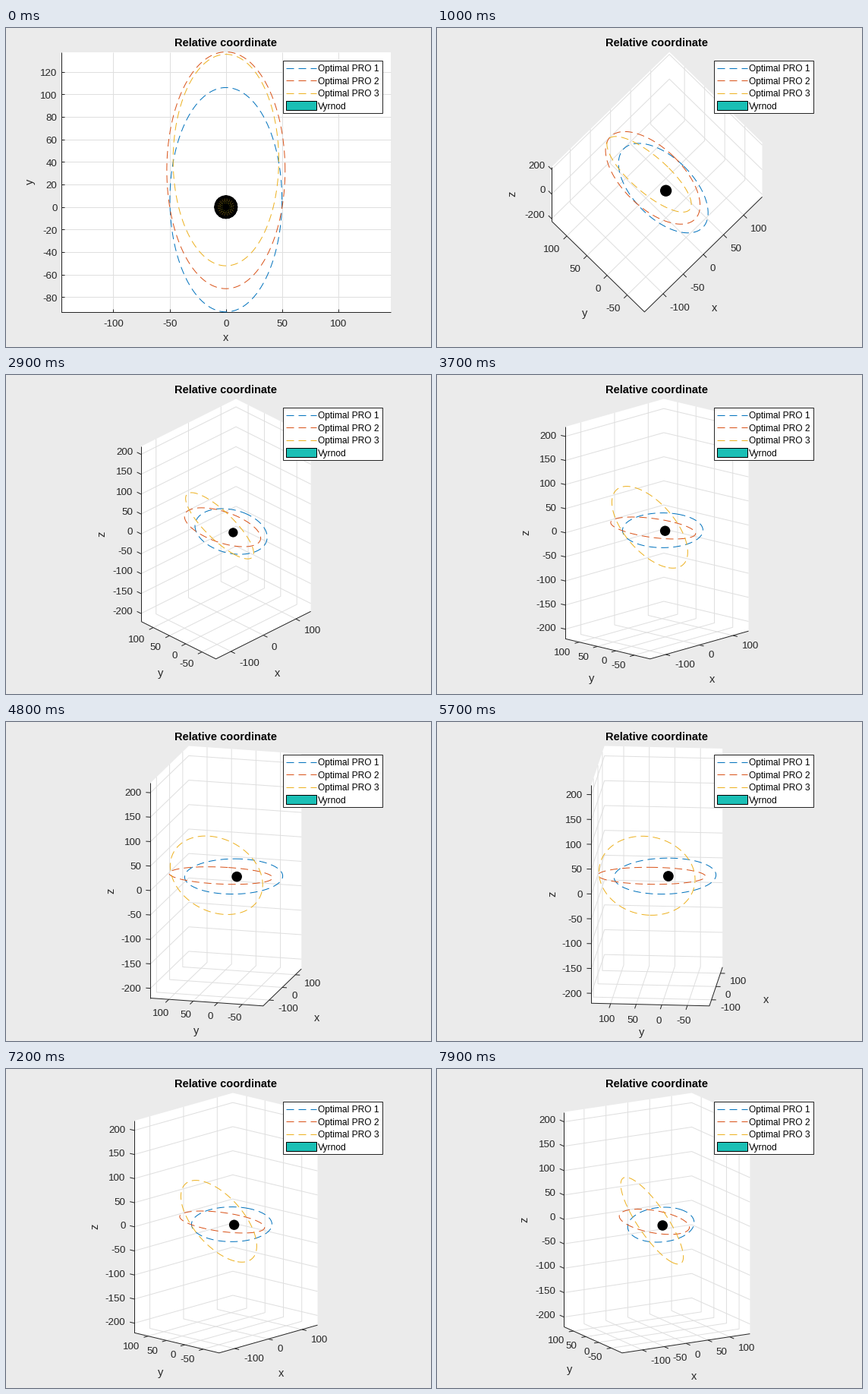
These frames come from a looping animation (560x420 px, 8 s). A matplotlib script:

```python
import numpy as np
import matplotlib.pyplot as plt
from matplotlib.animation import FuncAnimation
from matplotlib.collections import LineCollection, PolyCollection
from matplotlib.patches import Circle, Polygon, Rectangle

W, H, DPI = 560, 420, 100
PX = 72 / DPI                      # points per pixel
plt.rcParams["font.family"] = "Liberation Sans"

GREY, INK, GRID = "#ebebeb", "#262626", "#dfdfdf"
TEAL = "#1abfb5"
BOX_W, BOX_H = 434, 342.3          # plot area in pixels
CX, CY = 289.8, 202.65
LO = np.array([-146.2, -93.0, -220.0])
HI = np.array([146.2, 137.6, 220.0])
MID, SPAN = (LO + HI) / 2, HI - LO
BALL = 10.2

# name, colour, x half-width, y centre, z cosine and sine parts
ORBITS = [
    ("Optimal PRO 1", "#0072bd", 49.75, 6.5, 23, -3),
    ("Optimal PRO 2", "#d95319", 52.5, 32.6, 3, -0.5),
    ("Optimal PRO 3", "#edb120", 46.9, 41.7, -92, 2),
]
DASH = (0, (10, 6))

fig = plt.figure(figsize=(W / DPI, H / DPI), dpi=DPI, facecolor=GREY)
ax = fig.add_axes([0, 0, 1, 1])


class View:
    """Orthographic camera fitted to the plot area."""

    def __init__(self, az, el):
        self.az, self.el = az, el
        a, e = np.radians([az, el])
        ca, sa, ce, se = np.cos(a), np.sin(a), np.cos(e), np.sin(e)
        self.right = np.array([ca, sa, 0])
        self.up = np.array([-sa * se, ca * se, ce])
        self.toward = np.array([sa * ce, -ca * ce, se])
        self.scale = min(BOX_W / (SPAN @ abs(self.right)),
                         BOX_H / (SPAN @ abs(self.up)))

    def __call__(self, x, y, z):
        p = np.stack(np.broadcast_arrays(x, y, z), -1) - MID
        return np.stack([CX + self.scale * (p @ self.right),
                         CY - self.scale * (p @ self.up)], -1)

    def axis(self, i):
        """Screen vector of the whole axis i."""
        return self.scale * SPAN[i] * np.array([self.right[i], -self.up[i]])


def camera(n):
    if n < 5:
        return 0, 90
    if n < 36:
        return -45, 90 - 2.5 * (n - 5)
    if n < 55:
        return -45 - 2.5 * (n - 36), 15
    return -90 + 2.5 * (n - 55), 15


def ticks(i, step):
    first = np.ceil(LO[i] / step) * step
    return np.arange(first, HI[i], step)


def unit(v):
    return v / max(np.hypot(*v), 1e-9)


def label(x, y, s, size=13.33, ha="center", color=INK, rot=0, **kw):
    ax.text(x, y, s, fontsize=size * PX, ha=ha, va="baseline", color=color,
            rotation=rot, rotation_mode="anchor", zorder=9, **kw)


def number(x, y, value, ha):
    label(x, y + 4.8, f"{value:.0f}", ha=ha)


def lines(segs, color, z):
    ax.add_collection(LineCollection(segs, colors=color, linewidths=PX, zorder=z))


def draw_flat(v):
    left, top, bottom = CX - BOX_W / 2, CY - BOX_H / 2, CY + BOX_H / 2
    ax.add_patch(Rectangle((left, top), BOX_W, BOX_H, fc="white", zorder=0))
    grid, axes = [], [[(left, top), (left, bottom), (left + BOX_W, bottom)]]
    for t in ticks(0, 50):
        x = v(t, 0, 0)[0]
        grid.append([(x, top), (x, bottom)])
        axes.append([(x, bottom), (x, bottom - 4.3)])
        number(x, 388, t, "center")
    for t in ticks(1, 20):
        y = v(0, t, 0)[1]
        grid.append([(left, y), (left + BOX_W, y)])
        axes.append([(left, y), (left + 4.3, y)])
        number(67.5, y + 0.5, t, "right")
    lines(grid, GRID, 1)
    lines(axes, INK, 2)
    label(290, 411.5, "x", 14.67)
    label(35.5, 202, "y", 14.67, rot=90)


def draw_box(v):
    (x0, y0, z0), (x1, y1, z1) = LO, HI
    hull = [(x0, y0, z0), (x1, y0, z0), (x1, y0, z1),
            (x1, y1, z1), (x0, y1, z1), (x0, y1, z0)]
    ax.add_patch(Polygon([v(*p) for p in hull], fc="white", ec="none", zorder=0))

    vx, vy, vz = v.axis(0), v.axis(1), v.axis(2)
    zlen = np.hypot(*vz)
    show_z = v.el < 89.9
    xt = ticks(0, 50 if np.hypot(*vx) > 146 else 100)
    yt = ticks(1, 50)
    zt = ticks(2, 50 if zlen > 222 else 100 if zlen > 111 else 200)

    grid = []
    for t in xt:
        grid.append([v(t, y0, z0), v(t, y1, z0), v(t, y1, z1)])
    for t in yt:
        grid.append([v(x0, t, z0), v(x1, t, z0), v(x1, t, z1)])
    if show_z:
        for t in zt:
            grid.append([v(x0, y1, t), v(x1, y1, t), v(x1, y0, t)])
    lines(grid, GRID, 1)

    axes = [[v(x1, y0, z0), v(x0, y0, z0), v(x0, y1, z0)]]
    out_x, out_y, out_z = unit(-vy), unit(-vx), unit(vy)
    for t in xt:
        p = v(t, y0, z0)
        axes.append([p, p + 6 * out_x])
        number(p[0] + 12 * out_x[0], p[1] + 9.5 + 10.5 * out_x[1], t, "left")
    level = abs(vy[1]) < 0.1 * abs(vy[0])
    for t in yt:
        p = v(x0, t, z0)
        axes.append([p, p + 6 * out_y])
        reach = 14 if level else 12
        number(p[0] + reach * out_y[0], p[1] + 9.5 + 10.5 * out_y[1], t,
               "center" if level else "right")
    if show_z:
        axes.append([v(x0, y1, z0), v(x0, y1, z1)])
        for t in zt:
            p = v(x0, y1, t)
            axes.append([p, p + 6 * out_z])
            number(p[0] + 12 * out_z[0], p[1] + 9 * out_z[1], t, "right")
        p = v(x0, y1, 0)
        label(p[0] - 47.5, p[1], "z", 14.67, rot=90)
    lines(axes, INK, 2)

    # axis names sit outside the numbers and slide with the elevation
    slide = 0.69 * (v.el - 15)
    t = unit(vx)
    p = v(0, y0, z0) + (40 - 30 * t[1]) * np.array([-t[1], t[0]]) + (4 - slide) * t
    label(p[0], p[1] + 4, "x", 14.67)
    t = unit(vy)
    p = v(x0, MID[1], z0) + (39 - 27 * t[1]) * np.array([t[1], -t[0]]) + (11 - slide) * t
    label(p[0], p[1] + 2, "y", 14.67)


def draw_orbits(v):
    th = np.linspace(0, 2 * np.pi, 361)
    hub = v(0, 0, 0)
    for _, color, a, c, zc, zs in ORBITS:
        x, y = a * np.cos(th), c + 2 * a * np.sin(th)
        z = zc * np.cos(th) + zs * np.sin(th)
        p = v(x, y, z)
        ax.plot(*p.T, color=color, lw=PX, ls=DASH, dash_capstyle="butt", zorder=3)
        near = np.stack([x, y, z], -1) @ v.toward > 0
        over = near & (np.hypot(*(p - hub).T) < BALL * v.scale)
        if over.any():
            ax.plot(*np.where(over[:, None], p, np.nan).T, color=color, lw=PX, zorder=5)


def draw_ball(v, mesh):
    hub, r = v(0, 0, 0), BALL * v.scale
    ax.add_patch(Circle(hub, r, fc="black", ec="none", zorder=4))
    if not mesh:
        return
    faces, tint = [], []
    for k in range(2, 9):
        lat = np.radians([9 * k, 9 * k + 9])
        c = (1 + np.cos(lat[0])) / 2
        rgb = [np.interp(c, [0.5, 0.65, 0.8, 0.9, 1], ch) for ch in (
            [0.10, 0.45, 0.82, 0.99, 0.97],
            [0.74, 0.79, 0.75, 0.76, 0.98],
            [0.72, 0.42, 0.20, 0.22, 0.08])]
        for j in range(20):
            a = np.radians([18 * j, 18 * j + 18])
            rr = r * np.sin(lat)
            faces.append([hub + rr[m] * np.array([np.cos(a[n]), np.sin(a[n])])
                          for m, n in ((0, 0), (1, 0), (1, 1), (0, 1))])
            tint.append(rgb)
    ax.add_collection(PolyCollection(faces, facecolors=tint, edgecolors="black",
                                     linewidths=1.25 * PX, zorder=4.5))


def draw_legend():
    ax.add_patch(Rectangle((364.5, 42.5), 131, 69, fc="white", ec=INK, lw=PX, zorder=7))
    for k, orbit in enumerate(ORBITS):
        y = 52.5 + 16.7 * k
        ax.plot([368.5, 408.5], [y, y], color=orbit[1], lw=PX, ls=DASH,
                dash_capstyle="butt", zorder=8)
        label(411, y + 4.5, orbit[0], 12, "left", "black")
    ax.add_patch(Rectangle((368.5, 95.5), 40, 12, fc=TEAL, ec="black", lw=PX, zorder=8))
    label(411, 107, "Vyrnod", 12, "left", "black")


def draw(n):
    ax.cla()
    ax.set_xlim(0, W)
    ax.set_ylim(H, 0)
    ax.axis("off")
    v = View(*camera(n))
    flat = v.az == 0
    (draw_flat if flat else draw_box)(v)
    draw_orbits(v)
    draw_ball(v, flat)
    label(289.8, 24, "Relative coordinate", 14.67, color="black", weight="bold")
    draw_legend()
    return []


anim = FuncAnimation(fig, draw, frames=80, interval=100, repeat=True,
                     repeat_delay=0, init_func=lambda: draw(0))
plt.show()
```
